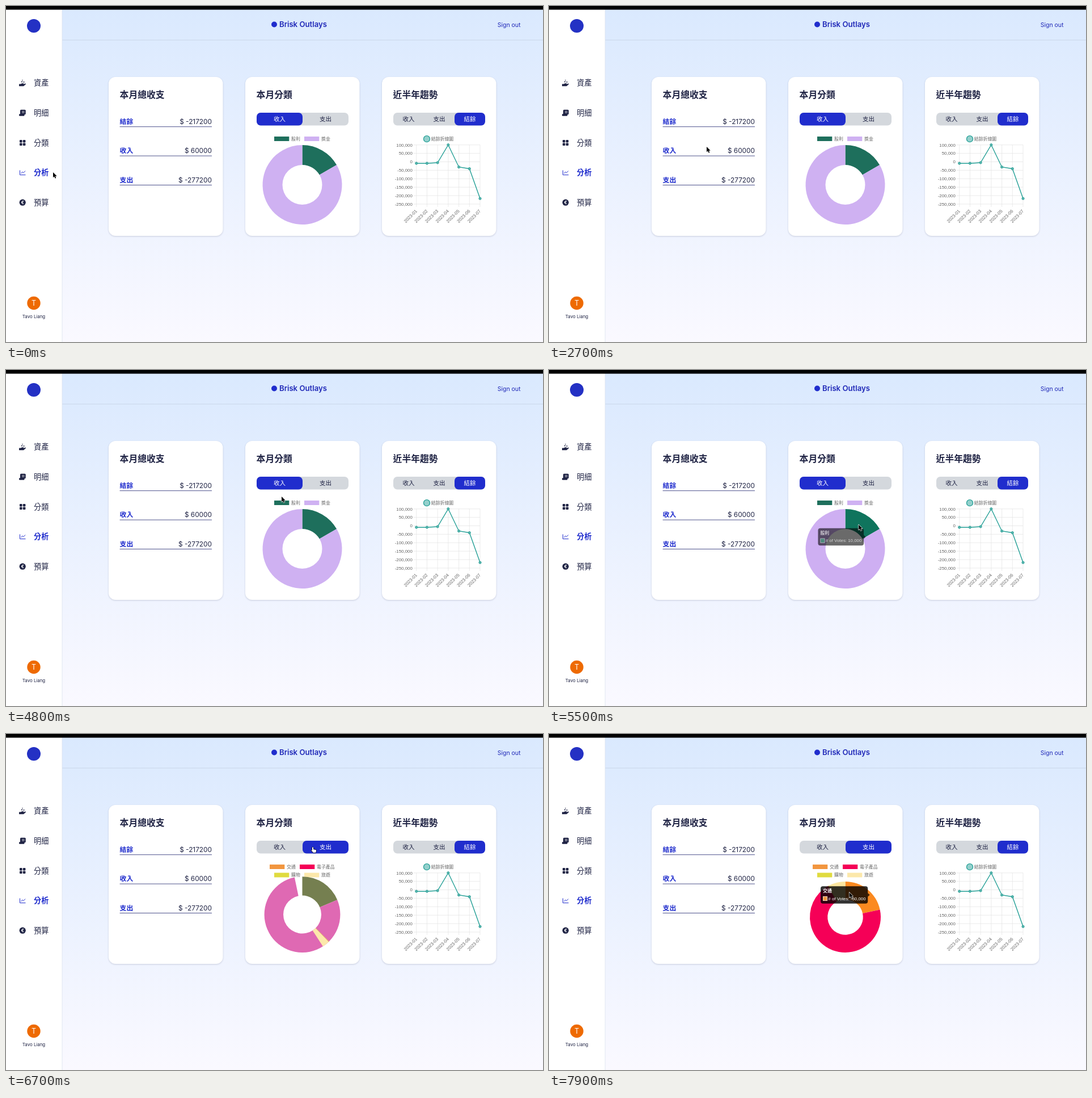
Write an HTML page with a canvas that moves like this. It is 947 by 592 pixels and loops after 8000 ms.

```html
<!DOCTYPE html>
<html lang="zh-Hant">
<head>
<meta charset="utf-8">
<title>Dashboard</title>
<style>
html, body { margin: 0; width: 100%; height: 100%; overflow: hidden; background: #fff; }
canvas { display: block; width: 947px; height: 592px; }
</style>
</head>
<body>
<canvas></canvas>
<script>
const W = 947, H = 592, LOOP = 8000, CLICK = 6578;
const INK = '#1f2344', BLUE = '#202dcd', TEAL = '#26a097', GREY = '#666';
const UI = 'Inter, "Noto Sans CJK TC", "Noto Sans CJK JP", sans-serif';
const CHART = '"Liberation Sans", "Noto Sans CJK TC", "Noto Sans CJK JP", sans-serif';

const canvas = document.querySelector('canvas');
const dpr = window.devicePixelRatio || 1;
canvas.width = W * dpr;
canvas.height = H * dpr;
const c = canvas.getContext('2d');

const clamp = v => Math.max(0, Math.min(1, v));
const lerp = (a, b, k) => a + (b - a) * k;
const quart = p => 1 - (1 - clamp(p)) ** 4;
const rgb = hex => [1, 3, 5].map(i => parseInt(hex.slice(i, i + 2), 16));
const mix = (a, b, k) => a.map((v, i) => lerp(v, b[i], k));

function text(str, x, y, size, color = INK, weight = 400, align = 'left', family = UI) {
  c.font = `${weight} ${size}px ${family}`;
  c.textAlign = align;
  c.textBaseline = 'alphabetic';
  c.fillStyle = color;
  c.fillText(str, x, y);
}
function label(str, x, y, align = 'left', color = GREY, weight = 400) {
  text(str, x, y, 7.9, color, weight, align, CHART);
}
function box(x, y, w, h, r, fill) {
  c.beginPath();
  c.roundRect(x, y, w, h, r);
  c.fillStyle = fill;
  c.fill();
}
function disc(x, y, r, fill) {
  c.beginPath();
  c.arc(x, y, r, 0, 7);
  c.fillStyle = fill;
  c.fill();
}
function line(points, color, width = 1) {
  c.beginPath();
  points.forEach(([x, y]) => c.lineTo(x, y));
  c.strokeStyle = color;
  c.lineWidth = width;
  c.stroke();
}

function sidebar() {
  box(0, 0, 99, H, 0, '#fff');
  line([[99, 0], [99, H]], '#dbe2ee', 0.8);
  disc(49, 35, 12, '#2431c4');
  ['資產', '明細', '分類', '分析', '預算'].forEach((name, i) => {
    const on = i === 3;
    text(name, 49, 140.4 + i * 52.6, 13.15, on ? BLUE : INK, on ? 700 : 500);
  });
  c.fillStyle = INK;
  c.fill(new Path2D('M23 137.5h3l2-1.2h3q1.2 .8-.5 2l3.3-1.8q2 0 .6 1.8l-3.4 2.9h-8z'));
  [[28, 133.5, 1.1], [31.5, 134, 1], [29, 130.7, .8]].forEach(d => disc(...d, INK));
  box(25, 182.7, 9.7, 8.6, 1.5, INK);
  box(23, 190.3, 9.5, 3.4, 1.2, INK);
  line([[28, 185.8], [32.5, 185.8]], '#fff', 0.8);
  line([[28, 188], [32.5, 188]], '#fff', 0.8);
  for (const x of [24, 29.8]) for (const y of [236, 241.6]) box(x, y, 4.6, 4.4, 1, INK);
  line([[24.5, 289.5], [24.5, 297.6], [34.5, 297.6]], BLUE, 1);
  line([[26.5, 295], [28.8, 292.3], [30.6, 294], [34, 290.5]], BLUE, 1);
  disc(29.2, 346.2, 5.6, INK);
  text('€', 29.2, 349, 8, '#fff', 700, 'center');
  disc(49, 523.5, 11.7, '#ee6a02');
  text('T', 49, 527.9, 12.4, '#fff', 400, 'center');
  text('Tavo Liang', 49, 550, 7.9, INK, 400, 'center');
}

function card(x, title) {
  c.save();
  c.shadowColor = 'rgba(30,40,80,.2)';
  c.shadowBlur = 3 * dpr;
  c.shadowOffsetY = 1 * dpr;
  box(x, 125, 201.5, 280, 12, '#fff');
  c.restore();
  text(title, x + 19.6, 162.3, 15.8, INK, 700);
}

function tabs(x, names, active) {
  const w = 162 / names.length;
  box(x, 188, 162, 22.5, 7, '#d4d8dd');
  box(x + active * w, 188, w, 22.5, 7, BLUE);
  names.forEach((name, i) =>
    text(name, x + (i + .5) * w, 203.2, 10.5, i === active ? '#fff' : INK, 500, 'center'));
}

function trend() {
  const values = [-9000, -9000, -5000, 100000, -31000, -41000, -217200];
  const px = i => 723.7 + i * 18.72, py = v => 244.7 + (100000 - v) / 50000 * 14.9;
  disc(742, 234.2, 5.5, '#94d0cc');
  c.strokeStyle = TEAL;
  c.lineWidth = 1.3;
  c.stroke();
  label('結餘折線圖', 749.8, 237);
  for (let i = 0; i < 8; i++) {
    const v = 100000 - i * 50000;
    line([[718.5, py(v)], [836, py(v)]], '#e3e3e3', 0.7);
    label(v.toLocaleString('en-US'), 716.8, py(v) + 2.8, 'right');
  }
  values.forEach((v, i) => {
    line([[px(i), 244.7], [px(i), 354]], '#e3e3e3', 0.7);
    c.save();
    c.translate(px(i) - .3, 360);
    c.rotate(-Math.PI / 4);
    label('2023-0' + (i + 1), 0, 2.8, 'right');
    c.restore();
  });
  line(values.map((v, i) => [px(i), py(v)]), TEAL, 1.4);
  values.forEach((v, i) => {
    disc(px(i), py(v), 2.1, '#5ab5ae');
    c.strokeStyle = TEAL;
    c.lineWidth = 0.9;
    c.stroke();
  });
}

function page() {
  const sky = c.createLinearGradient(0, 7, 0, H);
  sky.addColorStop(0, '#dae9fe');
  sky.addColorStop(1, '#faf9ff');
  box(0, 0, W, H, 0, sky);
  line([[99, 60], [W, 60]], '#c3d0e2', 0.8);
  sidebar();
  box(0, 0, W, 6.6, 0, '#000');
  disc(473, 32.5, 5, BLUE);
  text('Brisk Outlays', 482, 37.4, 13.15, '#2029b8', 600);
  text('Sign out', 907.5, 36.6, 10.5, '#2029b8', 400, 'right');
  card(181, '本月總收支');
  [['結餘', -217200], ['收入', 60000], ['支出', -277200]].forEach(([name, sum], i) => {
    const y = 208 + i * 51.4;
    text(name, 200.6, y, 11.84, BLUE, 700);
    text('$ ' + sum, 363, y, 11.84, INK, 400, 'right');
    line([[200.6, y + 4.7], [363, y + 4.7]], '#3a4080', 0.9);
  });
  card(422, '本月分類');
  card(663, '近半年趨勢');
  tabs(683, ['收入', '支出', '結餘'], 2);
  trend();
}

// Doughnut data: name, amount, colour, hover colour, legend position
const income = [
  ['股利', 10000, '#1e6f5c', '#09765d', 473, 234],
  ['獎金', 50000, '#cfb1f2', '#b879ff', 526, 234]];
const spending = [
  ['交通', -60000, '#f2963f', '#ff8615', 465, 234],
  ['電子產品', -195000, '#f50057', '#dc004e', 518, 234],
  ['購物', -1200, '#e0db40', '#d8d21e', 473, 248.5],
  ['旅遊', -21000, '#fce8ab', '#ffdf7d', 526, 248.5]];

function arcs(data) {
  const total = data.reduce((s, d) => s + d[1], 0);
  let a = 0;
  return data.map(d => [a, a += d[1] / total * 2 * Math.PI]);
}
const incomeArcs = arcs(income), spendingArcs = arcs(spending);

function tipLines(data, i) {
  return [data[i][0], '# of Votes: ' + data[i][1].toLocaleString('en-US')];
}
function tipPlace(late, i) {
  const data = late ? spending : income;
  const [a, b] = (late ? spendingArcs : incomeArcs)[i], mid = (a + b) / 2;
  const r = late ? 46.9 : 52.5, right = mid < Math.PI;
  c.font = '7.9px ' + CHART;
  const w = c.measureText(tipLines(data, i)[1]).width + 17;
  const x = 522.5 + r * Math.sin(mid), y = (late ? 322.5 : 315) - r * Math.cos(mid);
  return { data, i, w, right, x: right ? x - 3 - w : x + 3, y: y - 15.5 };
}

// Hover changes: time, slice (-1 for none)
const hovers = [[4850, 1], [5225, -1], [5390, 0], [5910, -1], [7215, 1], [7490, 3], [7790, 0]];

function hoverState(t) {
  const s = { x: 0, y: 0, alpha: 0, glow: [0, 0, 0, 0], tip: null };
  hovers.forEach(([start, i], n) => {
    if (t < start) return;
    const d = Math.min(t, hovers[n + 1]?.[0] ?? LOOP) - start;
    const k = quart(d / 400), on = i >= 0;
    if (on) {
      s.tip = tipPlace(start > CLICK, i);
      const from = s.alpha ? s : s.tip;
      [s.x, s.y] = [lerp(from.x, s.tip.x, k), lerp(from.y, s.tip.y, k)];
    }
    s.alpha = clamp(s.alpha + (on ? d : -d) / 200);
    s.glow = s.glow.map((g, j) => lerp(g, j === i ? 1 : 0, k));
  });
  return s;
}

function doughnut(t, glow) {
  const late = t >= CLICK, data = late ? spending : income;
  const q = quart((t - CLICK) / 1000), cy = 315 + 7.5 * q, r = 70 - 7.5 * q;
  data.forEach(([name, , color, , x, y]) => {
    box(x, y - 4, 26.3, 8, 0, color);
    label(name, x + 30, y + 2.8);
  });
  data.forEach((d, i) => {
    const old = incomeArcs[i] || [0, 0];
    const [a, b] = late ? mix(old, spendingArcs[i], q) : old;
    const base = mix(rgb((income[i] || d)[2]), rgb(d[2]), q);
    c.beginPath();
    c.arc(522.5, cy, r, a - Math.PI / 2, b - Math.PI / 2);
    c.arc(522.5, cy, r / 2, b - Math.PI / 2, a - Math.PI / 2, true);
    c.fillStyle = `rgb(${mix(base, rgb(d[3]), glow[i]).map(Math.round)})`;
    c.fill();
  });
}

function tooltip({ x, y, alpha, tip }) {
  if (!alpha) return;
  const [title, body] = tipLines(tip.data, tip.i);
  const edge = tip.right ? x + tip.w : x, out = tip.right ? 3.3 : -3.3;
  c.save();
  c.globalAlpha = alpha;
  c.beginPath();
  c.roundRect(x, y, tip.w, 30.5, 4);
  c.fillStyle = 'rgba(0,0,0,.8)';
  c.fill();
  c.beginPath();
  c.moveTo(edge, y + 12);
  c.lineTo(edge + out, y + 15.3);
  c.lineTo(edge, y + 18.6);
  c.fill();
  label(title, x + 4, y + 11, 'left', '#fff', 700);
  box(x + 4, y + 17.8, 8, 8, 0, '#fff');
  box(x + 4.7, y + 18.5, 6.6, 6.6, 0, tip.data[tip.i][2]);
  label(body, x + 13.3, y + 24.6, 'left', '#fff');
  c.restore();
}

// Pointer path: time, x, y
const path = [
  [0, 83, 293], [700, 83, 293], [1500, 222, 208], [1800, 222, 208], [2250, 312, 203],
  [2700, 278, 248], [3050, 285, 258], [3600, 299, 300], [3800, 318, 302], [4400, 491, 146],
  [4500, 491, 154], [4800, 486, 223], [5000, 486, 262], [5100, 486, 262], [5250, 504, 290],
  [5390, 538, 279], [5500, 546, 272.5], [5800, 548, 264], [6000, 546, 236], [6300, 541, 199],
  [7000, 541, 199], [7200, 494, 284], [7300, 480.5, 291], [7500, 504, 277], [7750, 517, 277],
  [7900, 529.5, 279], [LOOP, 533, 281]];
const arrow = new Path2D('M0 0v9.2l2.1-1.9 1.6 3.4 1.6-.8-1.5-3.1h2.9z');
const hand = new Path2D('M-1 1q1-1.5 2 0v3.2l4 .7q1.3.3 1 1.8l-.8 3.3h-4.4l-3.4-4q.3-1.3 1.6-.2z');

function pointer(t) {
  const n = path.findIndex(p => p[0] > t), [t0, x0, y0] = path[n - 1], [t1, x1, y1] = path[n];
  const p = (t - t0) / (t1 - t0), k = p * p * (3 - 2 * p);
  const x = lerp(x0, x1, k), y = lerp(y0, y1, k);
  const onTabs = x > 442 && x < 604 && y > 188 && y < 210.5;
  const shape = onTabs ? hand : arrow;
  c.save();
  c.translate(x, y);
  c.lineWidth = 1.2;
  c.lineJoin = 'round';
  c.strokeStyle = onTabs ? '#000' : '#fff';
  c.fillStyle = onTabs ? '#fff' : '#000';
  c.stroke(shape);
  c.fill(shape);
  c.restore();
}

function draw(now) {
  const t = now % LOOP, state = hoverState(t);
  c.setTransform(dpr, 0, 0, dpr, 0, 0);
  page();
  tabs(442, ['收入', '支出'], t < CLICK ? 0 : 1);
  doughnut(t, state.glow);
  tooltip(state);
  pointer(t);
  requestAnimationFrame(draw);
}
requestAnimationFrame(draw);
</script>
</body>
</html>
```
